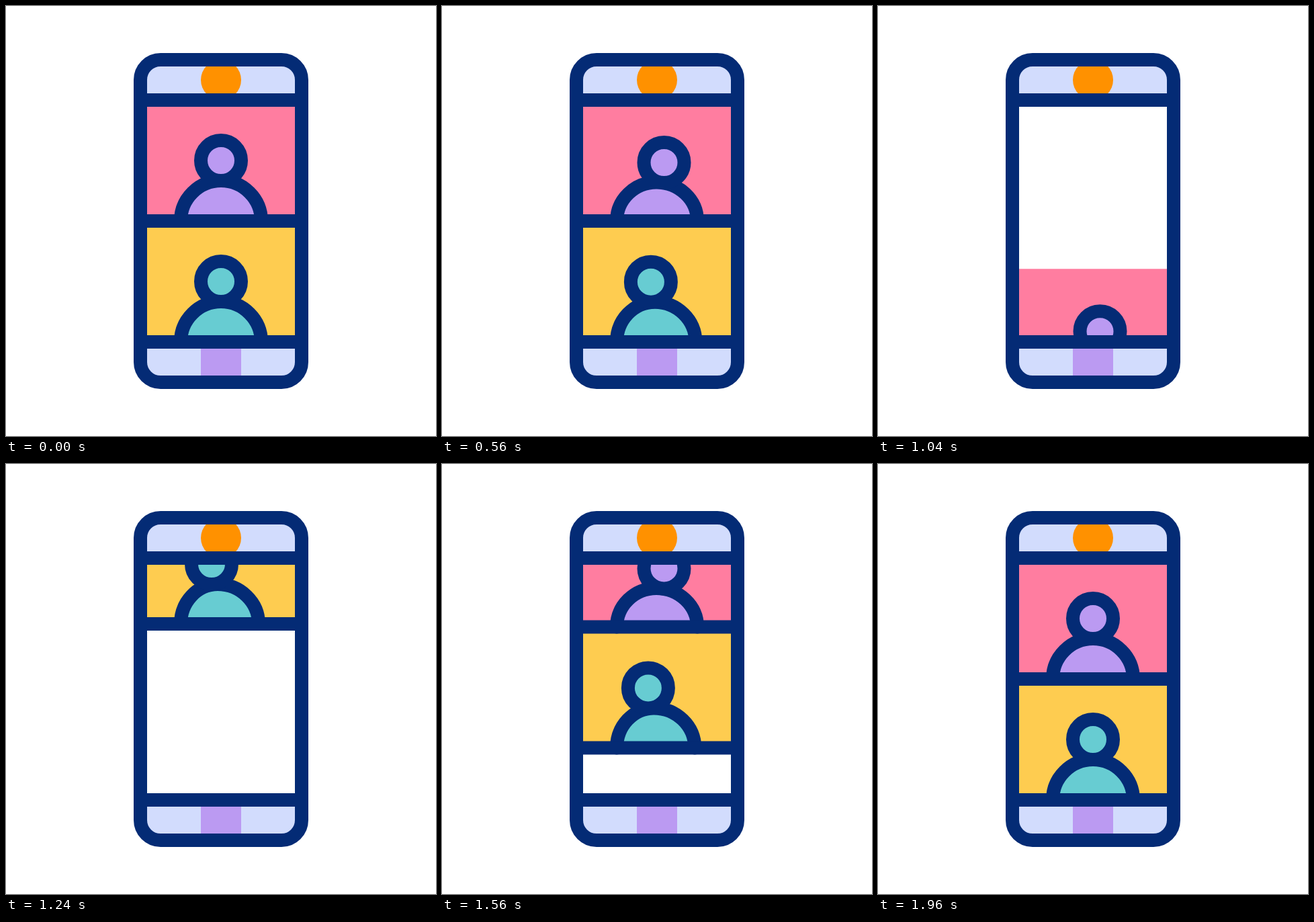
Write an HTML page that moves like this. It is 640 px wide and 640 px high and loops after 2000 ms.

```html
<!DOCTYPE html>
<html>
<head>
<meta charset="utf-8">
<style>
  html, body { margin: 0; width: 100%; height: 100%; overflow: hidden; background: #fff; }
  svg { display: block; width: 100vw; height: 100vh; }
  .line { stroke: #042b75; stroke-width: 20; stroke-linecap: round; }
</style>
</head>
<body>
<svg viewBox="0 0 640 640">
  <clipPath id="screen"><rect x="200" y="140" width="240" height="360"/></clipPath>
  <g id="phone">
    <rect x="200" y="80" width="240" height="480" rx="30" fill="#d2dcfd"/>
    <circle cx="320" cy="110" r="30" fill="#ff9100"/>
    <path d="M290 500h60v60h-60z" fill="#bb9af2"/>
    <path d="M200 140h240v360h-240z" fill="#fff"/>
    <g clip-path="url(#screen)">
      <g id="strip">
        <path d="M200 140h240v180h-240z" fill="#ff7da0"/>
        <path d="M200 320h240v180h-240z" fill="#fecc50"/>
        <g class="line" fill="#bb9af2"><path id="body1"/><circle id="head1" r="30"/></g>
        <g class="line" fill="#67ccd2"><path id="body2"/><circle id="head2" r="30"/></g>
        <path class="line" d="M200 320h240M200 500h240"/>
      </g>
    </g>
    <g class="line" fill="none">
      <path d="M200 140h240M200 500h240"/>
      <rect x="200" y="80" width="240" height="480" rx="30"/>
    </g>
  </g>
</svg>
<script>
const $ = id => document.getElementById(id);
const part = (t, a, b) => Math.min(1, Math.max(0, (t - a) / (b - a)));
const ease = (t, a, b) => { const u = part(t, a, b); return u * u * (3 - 2 * u); };

// Tilts one person; base is the panel's bottom line, k runs from 0 (upright) to 1.
function pose(n, base, k, dx, dy, topX, topY, rightX) {
  const x = 320 + topX * k, right = 380 + rightX * k, ry = 60 - topY * k;
  $('body' + n).setAttribute('d',
    `M260 ${base}A${x - 260} ${ry} 0 0 1 ${x} ${base - ry}A${right - x} ${ry} 0 0 1 ${right} ${base}`);
  $('head' + n).setAttribute('cx', 320 + dx * k);
  $('head' + n).setAttribute('cy', base - 90 + dy * k);
}

// The panels fall out of the bottom, then come back in from the top.
const scroll = t => t < 1120
  ? 360 * part(t, 640, 1120) ** 2
  : -360 * (1 - part(t, 1120, 1943)) ** 2;

function draw(now) {
  const t = now % 2000;
  const bounce = 27 * ease(t, 40, 200) - 37 * ease(t, 200, 335) + 10 * ease(t, 335, 500);
  $('phone').setAttribute('transform', `translate(0 ${bounce})`);
  $('strip').setAttribute('transform', `translate(0 ${scroll(t)})`);
  pose(1, 320, ease(t, 200, 560) - ease(t, 1600, 1960), 10.5, 3, -1, 2.5, 0);
  pose(2, 500, ease(t, 320, 720) - ease(t, 1500, 1900), -14, 1, -5, 1, -4);
  requestAnimationFrame(draw);
}
draw(performance.now());
</script>
</body>
</html>
```
